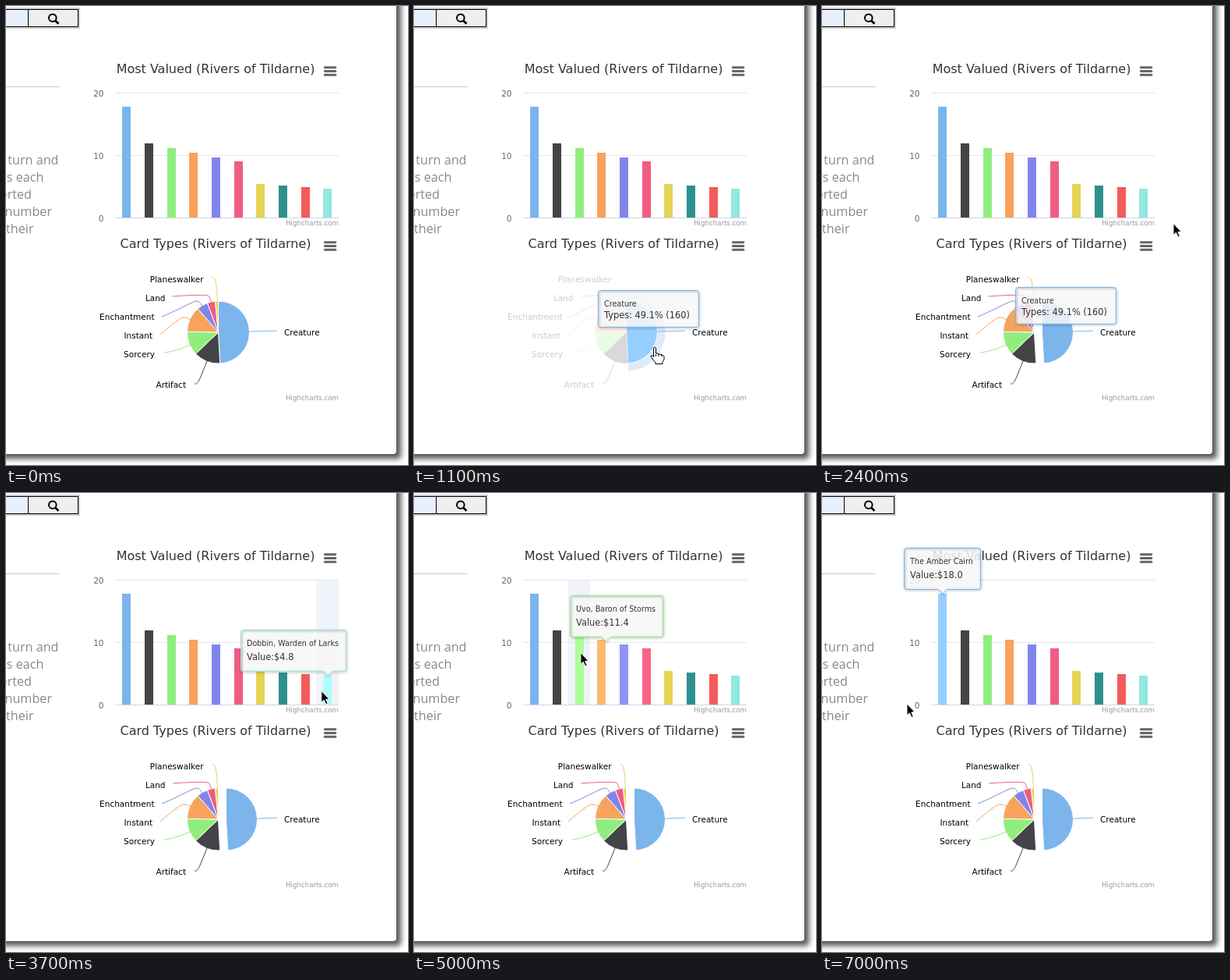
Animation, 516 px wide and 588 px high, one loop 7.1 s. Source, as an HTML page with a canvas:

```html
<!DOCTYPE html>
<html lang="en">
<head>
<meta charset="utf-8">
<title>Card set charts</title>
<style>
html, body { margin: 0; width: 100%; height: 100%; overflow: hidden; background: #fff; }
canvas { display: block; }
</style>
</head>
<body>
<canvas id="stage" width="516" height="588"></canvas>
<script>
const ctx = document.getElementById('stage').getContext('2d');
const LOOP = 7100;
const CHART_FONT = '"DejaVu Sans", sans-serif';
const BODY_FONT = '"Open Sans", sans-serif';
const SET_NAME = 'Rivers of Tildarne';

// Bar chart geometry
const PLOT = { left: 140, right: 427, top: 111.5, base: 271.5 };
const STEP = 28.7;
const FADE = 300;
const CARDS = [
  ['The Amber Cairn', 18.0, '#7cb5ec'],
  ['Ember Granary', 12.1, '#434348'],
  ['Uvo, Baron of Storms', 11.36, '#90ed7d'],
  ['Fen Bells', 10.6, '#f7a35c'],
  ['Hollow Kiln', 9.8, '#8085e9'],
  ['Copper Heron', 9.2, '#f15c80'],
  ['Salt Orchard', 5.6, '#e4d354'],
  ['Murk Lantern', 5.3, '#2b908f'],
  ['Pale Ferryman', 5.1, '#f45b5b'],
  ['Dobbin, Warden of Larks', 4.8, '#91e8e1']
];

// Pie slices: label, end share in %, label x, label baseline, leader path
const PIE = { x: 272.5, y: 418, r: 40 };
const SLICES = [
  ['Creature', 49.1, 357, 422, ''],
  ['Artifact', 62.9, 231, 489, 'M242 484C247 485 248 479 258 455'],
  ['Sorcery', 75.3, 191, 450, 'M203 444C215 443 226 438 237 434'],
  ['Instant', 88.6, 188, 426, 'M198 421C210 410 224 399 228 399C232 399 234 400 237 402'],
  ['Enchantment', 94.3, 190.5, 402, 'M200 398C218 391 240 378 245 378C249 378 250 382 252 385'],
  ['Land', 98.4, 204.5, 378, 'M214 372C240 370 256 370 259 371C262 372 262 376 264 380'],
  ['Planeswalker', 100, 253.5, 354, 'M264 348C269 347 270 352 271.5 378']
];

// Pointer track: time, x, y
const TRACK = [
  [100, 470, 600], [900, 309, 437], [1750, 309, 437], [1950, 321, 433],
  [2400, 451, 278.5], [2700, 457, 278], [3000, 457, 268], [3300, 440, 258],
  [3600, 405, 253.5], [4200, 404, 253], [4600, 345, 235], [5000, 214, 204.5],
  [5550, 169, 195], [5800, 161, 193], [6400, 161, 193], [7000, 109, 270], [7100, 109, 270]
];
const PIE_IN = 850, PIE_OUT = 1950, BARS_IN = 3420;

const clamp = (v, lo = 0, hi = 1) => Math.min(hi, Math.max(lo, v));
const ramp = (t, from, to) => clamp((t - from) / (to - from));
const ease = p => (1 - Math.cos(Math.PI * p)) / 2;
const valueY = v => 272.4 - 7.97 * v;

function pointer(t) {
  let i = 1;
  while (i < TRACK.length - 1 && TRACK[i][0] < t) i++;
  const [t0, x0, y0] = TRACK[i - 1], [t1, x1, y1] = TRACK[i];
  const p = ramp(t, t0, t1);
  return { x: x0 + (x1 - x0) * p, y: y0 + (y1 - y0) * p };
}

function hoveredBar(t) {
  if (t < BARS_IN) return -1;
  return clamp(Math.floor((pointer(t).x - PLOT.left) / STEP), 0, CARDS.length - 1);
}

function brighten(hex, amount) {
  const parts = [1, 3, 5].map(i =>
    Math.min(255, Math.round(parseInt(hex.slice(i, i + 2), 16) + 25.5 * amount)));
  return `rgb(${parts})`;
}

function rect(x, y, w, h, fill) {
  ctx.fillStyle = fill;
  ctx.fillRect(x, y, w, h);
}

function line(x0, y0, x1, y1, color, width = 1) {
  ctx.strokeStyle = color;
  ctx.lineWidth = width;
  ctx.beginPath();
  ctx.moveTo(x0, y0);
  ctx.lineTo(x1, y1);
  ctx.stroke();
}

function text(str, x, y, size, color, align = 'left', family = CHART_FONT) {
  ctx.font = `${size}px ${family}`;
  ctx.textAlign = align;
  ctx.fillStyle = color;
  ctx.fillText(str, x, y);
}

function polygon(x, y, points, fill, stroke) {
  ctx.beginPath();
  points.forEach(([dx, dy]) => ctx.lineTo(x + dx, y + dy));
  ctx.closePath();
  ctx.lineJoin = 'round';
  ctx.fillStyle = fill;
  ctx.strokeStyle = stroke;
  ctx.lineWidth = 1;
  ctx.fill();
  ctx.stroke();
}

function drawPage() {
  rect(0, 0, 516, 588, '#fff');
  ctx.save();
  ctx.shadowColor = '#555';
  ctx.shadowBlur = 7;
  ctx.shadowOffsetX = ctx.shadowOffsetY = 6;
  ctx.fillStyle = '#fff';
  ctx.beginPath();
  ctx.roundRect(-60, -60, 561, 634, 4);
  ctx.fill();
  ctx.restore();

  // Search bar
  rect(-2, 2, 97, 27, '#ccc');
  rect(-2, 4, 95, 23, '#000');
  rect(-2, 5, 30, 21, '#e8f0fe');
  rect(29, 5, 63, 21, '#efefef');
  ctx.strokeStyle = '#000';
  ctx.lineWidth = 2;
  ctx.beginPath();
  ctx.arc(59.8, 15.2, 4.8, 0, Math.PI * 2);
  ctx.stroke();
  line(63, 18.5, 67.5, 22.8, '#000', 2.8);

  line(0, 103.5, 69, 103.5, '#ccc');
  [['turn and', 67.5], ['deals each', 48.5], ['inverted', 33], ['number', 59], ['their', 35.5]]
    .forEach(([str, x], i) => text(str, x, 203 + 21.9 * i, 16.2, '#8a8a8a', 'right', BODY_FONT));
}

function drawHeading(title, y) {
  text(`${title} (${SET_NAME})`, 269, y, 16, '#333', 'center');
  ctx.lineCap = 'round';
  for (let i = -1; i <= 1; i++) {
    line(409.3, y - 2.5 + i * 4.8, 422.8, y - 2.5 + i * 4.8, '#666', 3);
  }
  ctx.lineCap = 'butt';
}

function drawBars(t) {
  drawHeading('Most Valued', 86);
  const current = hoveredBar(t);
  if (current >= 0 && pointer(t).x > PLOT.left) {
    rect(PLOT.left + current * STEP, PLOT.top, STEP, 160, 'rgba(204,214,235,0.3)');
  }
  [20, 10, 0].forEach((v, i) => {
    const y = PLOT.top + 80 * i;
    line(PLOT.left, y, PLOT.right, y, v ? '#e6e6e6' : '#ccd6eb');
    text(v, 125.5, y + 4, 10.5, '#666', 'right');
  });

  // Highlights linger and fade after the pointer moves on
  const glow = CARDS.map(() => 0);
  for (let d = FADE; d >= 0; d -= 10) {
    const i = hoveredBar(t - d);
    if (i >= 0) glow[i] = 1 - d / FADE;
  }
  CARDS.forEach(([, value, color], i) => {
    const top = Math.round(valueY(value));
    rect(Math.round(149.15 + STEP * i), top, 11, 271 - top, brighten(color, glow[i]));
  });
  text('Highcharts.com', 427, 281, 8.65, '#999', 'right');
}

function wedge(x, y, r, from, to, fill) {
  const angle = share => (share / 100 * 2 - 0.5) * Math.PI;
  ctx.beginPath();
  ctx.moveTo(x, y);
  ctx.arc(x, y, r, angle(from), angle(to));
  ctx.closePath();
  ctx.fillStyle = fill;
  ctx.fill();
}

function drawPie(t) {
  drawHeading('Card Types', 310);
  const hover = t >= PIE_IN && t < PIE_OUT;
  const dim = 1 - 0.8 * ramp(t, PIE_IN, PIE_IN + 60) * (1 - ramp(t, PIE_OUT, PIE_OUT + 200));
  const glow = hover ? 1 : 1 - ramp(t, PIE_OUT, PIE_OUT + FADE);
  const shift = 10 * ease(ramp(t, 1650, 1950));
  let from = 0;

  SLICES.forEach(([label, to, x, y, path], i) => {
    const color = CARDS[i][2];
    const main = i === 0;
    const cx = PIE.x + (main ? shift : 0);
    ctx.globalAlpha = main ? 1 : dim;
    if (main && hover) {
      ctx.globalAlpha = 0.25;
      wedge(cx, PIE.y, PIE.r + 10, from, to, color);
      ctx.globalAlpha = 1;
    }
    wedge(cx, PIE.y, PIE.r, from, to, main && t > PIE_IN ? brighten(color, glow) : color);
    ctx.strokeStyle = '#fff';
    ctx.lineWidth = 1;
    ctx.lineJoin = 'round';
    ctx.stroke();
    ctx.strokeStyle = color;
    ctx.stroke(new Path2D(path || `M348 416L${PIE.x + PIE.r + shift} 417`));
    text(label, x, y, 10.5, '#000', main ? 'left' : 'right');
    from = to;
  });
  ctx.globalAlpha = 1;
  text('Highcharts.com', 427, 505, 8.65, '#999', 'right');
}

function drawTip({ x, y, w, h, color, anchor, name, value, valueY, alpha = 1 }) {
  ctx.save();
  ctx.globalAlpha = alpha;
  // Half-pixel edges keep the border crisp
  x = Math.round(x) + 0.5;
  y = Math.round(y) + 0.5;
  const r = x + Math.round(w), b = y + h;
  ctx.beginPath();
  if (anchor === undefined) {
    ctx.roundRect(x, y, r - x, h, 3);
  } else {
    ctx.moveTo(x + 3, y);
    ctx.arcTo(r, y, r, b, 3);
    ctx.arcTo(r, b, x, b, 3);
    ctx.lineTo(anchor + 6, b);
    ctx.lineTo(anchor, b + 6);
    ctx.lineTo(anchor - 6, b);
    ctx.arcTo(x, b, x, y, 3);
    ctx.arcTo(x, y, r, y, 3);
    ctx.closePath();
  }
  ctx.fillStyle = 'rgba(247,247,247,0.85)';
  ctx.fill();
  ctx.shadowColor = 'rgba(0,0,0,0.45)';
  ctx.shadowBlur = 3;
  ctx.shadowOffsetX = ctx.shadowOffsetY = 1;
  ctx.strokeStyle = color;
  ctx.lineWidth = 1;
  ctx.stroke();
  ctx.shadowColor = 'transparent';
  text(name, x + 7.5, y + 20, 9.6, '#333');
  text(value, x + 7.5, y + valueY, 11.4, '#333');
  ctx.restore();
}

function barTipTarget(i) {
  const [name, value] = CARDS[i];
  ctx.font = `9.6px ${CHART_FONT}`;
  const w = Math.max(78, ctx.measureText(name).width + 17.5);
  const anchor = 154.5 + STEP * i;
  return { w, anchor, x: Math.min(anchor - w / 2, 436 - w), y: valueY(value) - 59.3 };
}

function drawBarTip(t) {
  const current = hoveredBar(t);
  if (current < 0) return;
  // The box chases the hovered bar
  let pos = null;
  for (let d = Math.min(700, t - BARS_IN); d >= 0; d -= 10) {
    const goal = barTipTarget(hoveredBar(t - d));
    if (!pos) pos = { ...goal };
    for (const key of ['x', 'y', 'anchor']) pos[key] += (goal[key] - pos[key]) * 0.09;
  }
  const [name, value, color] = CARDS[current];
  const { w } = barTipTarget(current);
  const anchor = clamp(pos.anchor, pos.x + 10, pos.x + w - 10);
  drawTip({ ...pos, w, h: 53, anchor, color, name, value: `Value:$${value.toFixed(1)}`, valueY: 38 });
}

function drawPieTip(t) {
  const alpha = t < PIE_IN ? 0 : 1 - ramp(t, 2500, 2750);
  if (!alpha) return;
  const p = pointer(Math.min(t, PIE_OUT));
  drawTip({
    x: p.x - 73, y: p.y - 73, w: 129, h: 47, color: CARDS[0][2],
    name: 'Creature', value: 'Types: 49.1% (160)', valueY: 35, alpha
  });
}

const ARROW = [[0, 0], [0, 15], [3.3, 11.8], [6, 17.4], [8.3, 16.4], [5.8, 11], [10, 10.6]];
const HAND = [
  [-1.5, 1], [0, 0], [1.5, 1], [1.5, 8], [4, 8], [5, 9], [8, 9], [9, 10], [11, 10.5], [12, 12],
  [12, 16], [10, 19], [10, 21.5], [1, 21.5], [1, 20], [-3, 15], [-5, 12], [-4, 10.5], [-1.5, 12.5]
];

function drawPointer(t) {
  if (t < 100) return;
  const { x, y } = pointer(t);
  if (t >= PIE_IN && t < PIE_OUT) {
    polygon(x, y, HAND, '#fff', '#000');
    [1.5, 5, 8.5].forEach(dx => line(x + dx, y + 9, x + dx, y + 12, '#000'));
  } else {
    polygon(x, y, ARROW, '#000', '#fff');
  }
}

const start = performance.now();

function draw() {
  const t = (performance.now() - start) % LOOP;
  drawPage();
  drawBars(t);
  drawPie(t);
  drawPieTip(t);
  drawBarTip(t);
  drawPointer(t);
  requestAnimationFrame(draw);
}
draw();
</script>
</body>
</html>
```
